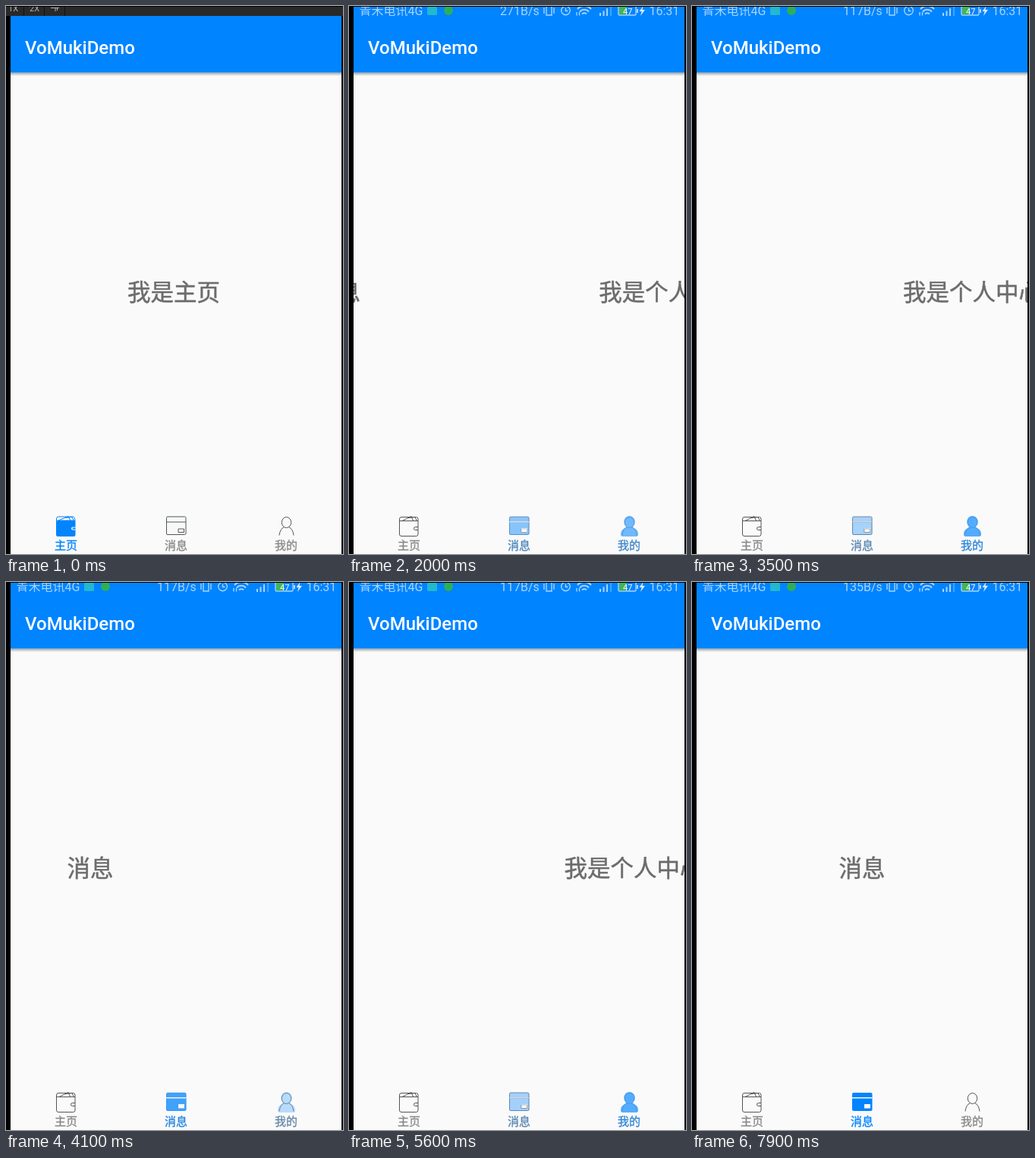
An HTML page for the animation above (8 s loop, 444 by 720 pixels).

```html
<!DOCTYPE html>
<html lang="zh-CN">
<head>
<meta charset="utf-8">
<title>Tab pager</title>
<style>
  html, body { margin: 0; width: 100%; height: 100%; overflow: hidden; background: #000; }
  svg { display: block; width: 444px; height: 720px; }
  text { font-family: Roboto, "Noto Sans CJK SC", "Noto Sans CJK", sans-serif; }
  .title { font-size: 24px; font-weight: 500; fill: #fff; }
  .page { font-size: 30.5px; fill: #6c6c6c; stroke: #6c6c6c; stroke-width: .5; text-anchor: middle; }
  .label { font-size: 15px; text-anchor: middle; fill: currentColor; stroke: currentColor; stroke-width: .3; }
  .status text { font-size: 16px; fill: #a9d3ff; }
  .line { fill: none; stroke: #a9d3ff; stroke-width: 1.4; }
  .bold { stroke-width: 2; }
  .off { fill: none; stroke: #555; stroke-linejoin: round; }
  .on { fill: #0084ff; }
  .flap { fill: none; stroke: #0084ff; }
  .cut { fill: #fafafa; }
  .tools text { font-size: 11px; fill: #b4b4b4; }
</style>
</head>
<body>
<svg viewBox="0 0 444 720">
  <defs>
    <clipPath id="screen"><rect x="6" y="1" width="436" height="719"/></clipPath>
    <clipPath id="strip"><rect y="1" width="444" height="12"/></clipPath>
    <linearGradient id="shade" x2="0" y2="1">
      <stop offset="0" stop-color="#6a5c54" stop-opacity=".55"/>
      <stop offset="1" stop-color="#6a5c54" stop-opacity="0"/>
    </linearGradient>
  </defs>
  <rect width="444" height="720"/>

  <g clip-path="url(#screen)">
    <rect x="6" y="13" width="436" height="707" fill="#fafafa"/>
    <g id="pages"></g>
    <rect x="6" y="87.5" width="436" height="4.5" fill="url(#shade)"/>
    <rect x="6" y="13" width="436" height="74.5" fill="#0084ff"/>
    <text class="title" x="25" y="63">VoMukiDemo</text>

    <g class="tab">
      <g class="off">
        <rect x="66.5" y="671.5" width="24.5" height="25" rx="2.5"/>
        <path d="M66.500 676.500H91M70 676.500L82 670.500L84.500 676M78 672.500L87 671.500L89.500 676.500M91 684.500H87.500a2 2 0 0 0 0 4H91"/>
      </g>
      <g class="on">
        <rect x="66" y="675.5" width="25.5" height="21.5" rx="2.5"/>
        <path class="flap" d="M66.500 677V674Q66.500 671 69 671H88Q91 671 91 677M69 676L82 670.500L85 676M78 672.500L87 671.500L89.500 676"/>
        <path class="cut" d="M91.500 684.500H88a2 2 0 0 0 0 4H91.500V687.500H88.500a1 1 0 0 1 0 -2H91.500Z"/>
      </g>
      <text class="label" x="79" y="713.5">主页</text>
    </g>

    <g class="tab">
      <g class="off">
        <rect x="211.5" y="671" width="25.5" height="23.5" rx="1.5"/>
        <path d="M211.500 678H237M227 687H234.500V691.500H227Z"/>
      </g>
      <g class="on">
        <rect x="211" y="671" width="26.5" height="24" rx="2"/>
        <path class="cut" d="M211 677H237.500V678.500H211ZM227 686H235V691.500H227Z"/>
      </g>
      <text class="label" x="224" y="713.5">消息</text>
    </g>

    <g class="tab">
      <g class="off">
        <ellipse cx="369.5" cy="678.5" rx="6.2" ry="7"/>
        <path d="M360 695.500Q361 687 366.500 684.500M372.500 684.500Q378 687 379 695.500"/>
      </g>
      <g class="on">
        <ellipse cx="369.5" cy="677.8" rx="7.3" ry="7.8"/>
        <path d="M366 683H373C373 686 381 686 381 694Q381 697 378.500 697H360.500Q358 697 358 694C358 686 366 686 366 683Z"/>
      </g>
      <text class="label" x="369" y="713.5">我的</text>
    </g>
  </g>

  <g id="tools" class="tools" clip-path="url(#strip)">
    <rect y="1" width="444" height="12" fill="#292929"/>
    <path d="M23.500 1V13M50.500 1V13M77.500 1V13" stroke="#111"/>
    <text x="3" y="7">1X</text>
    <text x="31" y="7">2X</text>
    <path d="M59 2.500H70M65 2.500V7M67.500 2.500V6" stroke="#b4b4b4"/>
  </g>

  <g id="status" class="status" clip-path="url(#strip)">
    <rect x="6" y="1" width="436" height="12" fill="#0084ff"/>
    <text x="13.5" y="12">青禾电讯4G</text>
    <rect x="103" y="1" width="13" height="11" rx="1.5" fill="#22b8cf"/>
    <circle cx="131" cy="6" r="6" fill="#2fae5a"/>
    <text id="speed" x="199" y="12"></text>
    <g class="line">
      <path d="M260 0V12H267V0M257 2V10M270 2V10"/>
      <circle cx="285.5" cy="6" r="5.8"/>
      <path d="M285.500 2.500V6.500H288.500"/>
      <path class="bold" d="M301 4A12 12 0 0 1 319 4M304 7.500A8 8 0 0 1 316 7.500M307 10.500A4 4 0 0 1 313 10.500"/>
      <path d="M300 8V12.500M303.500 8V12.500"/>
      <path class="bold" d="M331 9V13M335.500 6.500V13M340 3V13M380 4V9"/>
      <path class="bold" d="M345 0V13" opacity=".4"/>
      <rect x="355" y="0" width="23" height="12" rx="1.5"/>
    </g>
    <rect x="356" y="1" width="10" height="10.3" fill="#43b45c"/>
    <text x="361" y="10.5" style="font-size:11px;fill:#fff">47</text>
    <path d="M387.500 0L382.500 7H385.500L384 13L390 5H386.500Z" fill="#d5e9ff"/>
    <text x="395.5" y="12">16:31</text>
  </g>
</svg>
<script>
const LOOP = 8000, STEP = 100, WIDTH = 436, CENTER = 224;
const swing = x => (1 - Math.cos(Math.PI * x)) / 2;
const glide = x => Math.sin(Math.PI / 2 * x);

// Finger moves: the pager eases to a position between two times.
const moves = [
  { from: 100, until: 500, to: 1, ease: swing },
  { from: 1380, until: 2600, to: 1.766, ease: glide },
  { from: 2800, until: 2900, to: 1.704, ease: swing },
  { from: 3300, until: 4600, to: 1.047, ease: swing },
  { from: 4600, until: 6300, to: 2, ease: swing },
  { from: 6400, until: 6500, to: 1.995, ease: swing },
  { from: 6900, until: 7700, to: 1, ease: swing }
];
const $ = id => document.getElementById(id);
const tabs = [...document.querySelectorAll('.tab')].map(tab => ({
  off: tab.querySelector('.off'),
  on: tab.querySelector('.on'),
  label: tab.querySelector('.label')
}));

['我是主页', '消息', '我是个人中心'].forEach((name, i) => {
  const text = document.createElementNS('http://www.w3.org/2000/svg', 'text');
  text.setAttribute('class', 'page');
  text.setAttribute('x', CENTER + i * WIDTH);
  text.setAttribute('y', 387.3);
  text.textContent = name;
  $('pages').append(text);
});

function positionAt(t) {
  let pos = .007;
  for (const { from, until, to, ease } of moves) {
    const x = Math.min(1, Math.max(0, (t - from) / (until - from)));
    pos += (to - pos) * ease(x);
  }
  return pos;
}

function render(now) {
  const time = now % LOOP;
  const t = time - time % STEP;
  const pos = positionAt(t);
  $('pages').setAttribute('transform', `translate(${-pos * WIDTH} 0)`);
  tabs.forEach(({ off, on, label }, i) => {
    const a = Math.max(0, 1 - Math.abs(pos - i));
    off.style.opacity = 1 - a;
    on.style.opacity = a;
    label.style.color = `color-mix(in srgb, #0084ff ${a * 100}%, #888)`;
  });
  $('tools').style.display = t < 1100 ? '' : 'none';
  $('status').style.display = t < 1100 ? 'none' : '';
  $('speed').textContent = (t < 3100 ? 271 : t < 6000 ? 117 : 135) + 'B/s';
}

const start = performance.now();
function tick() {
  render(performance.now() - start);
  requestAnimationFrame(tick);
}
tick();
</script>
</body>
</html>
```
